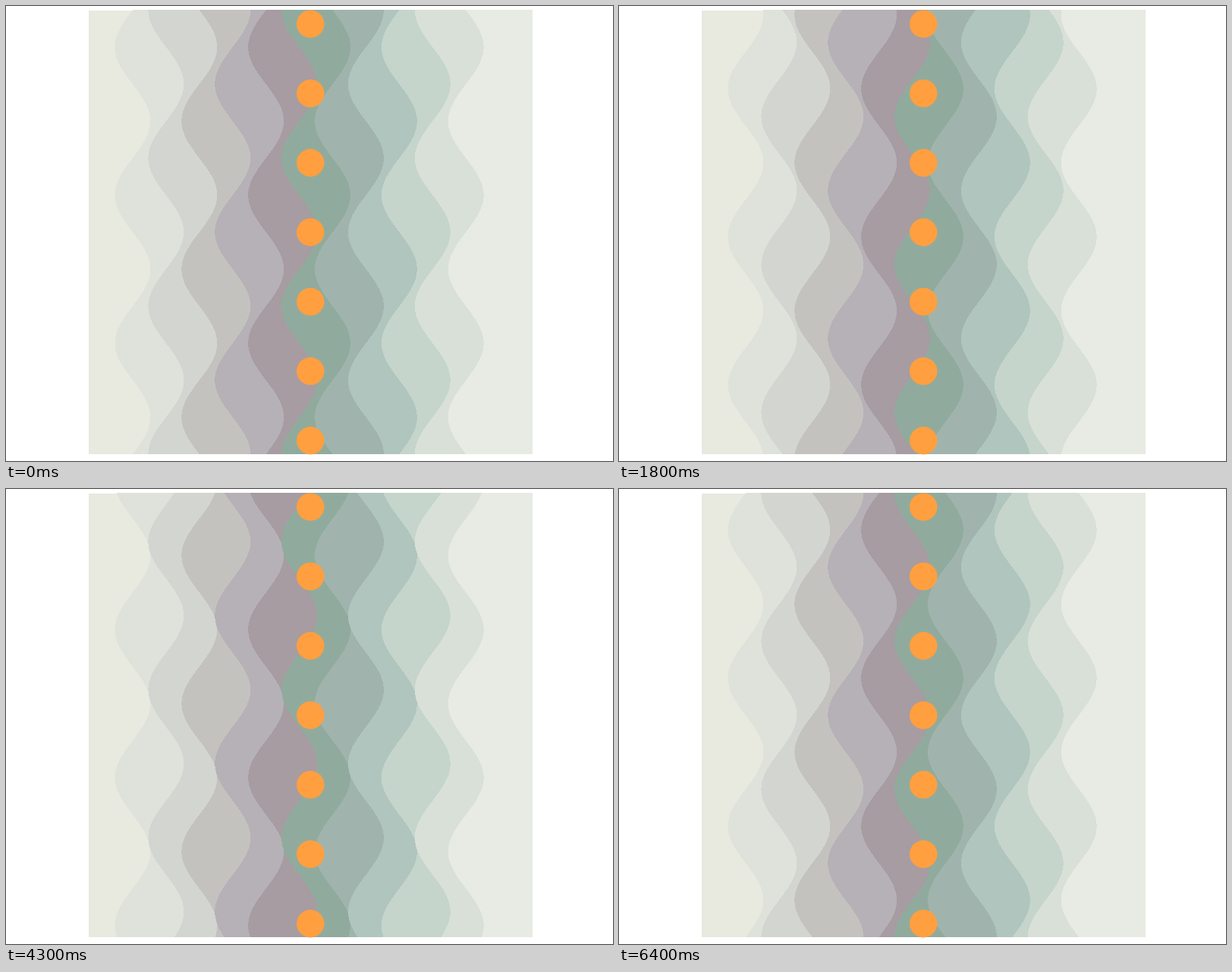
Animation, 800 px wide and 600 px high, one loop 6.5 s. Source, as an HTML page with a canvas:

```html
<!DOCTYPE html>
<html lang="en">
<head>
<meta charset="utf-8">
<title>Waves</title>
<style>
  html, body { margin: 0; width: 100%; height: 100%; overflow: hidden; background: #fff; }
  canvas { display: block; }
</style>
</head>
<body>
<canvas id="stage" width="800" height="600"></canvas>
<script>
const ctx = document.getElementById('stage').getContext('2d');
const LEFT = 109, RIGHT = 694, TOP = 5, BOTTOM = 591;
const UNIT = 14.64;
const AMPLITUDE = 1.6 * UNIT, SPACING = 3 * UNIT, FIRST_X = 166.95;
const WAVELENGTH = 195.2, WAVE_TOP = 5.4;
const STEP_MS = 100, STEPS = 65, STEPS_PER_TURN = 64;
const BACKGROUND = '#e8e9df', BALL = '#ff9f40';
const LAYERS = ['#dfe2da', '#d3d5d1', '#c4c2bf', '#b6b1b6', '#a69ca2', '#90ab9d',
                '#a0b4ad', '#b0c5be', '#c5d5cb', '#d9e0d8', '#e7ebe3'];

// Alternate edges travel down and up; the sign flips every two edges.
function edgeX(index, y, turn) {
  const angle = (y - WAVE_TOP) / WAVELENGTH * 2 * Math.PI;
  const sign = index % 4 < 2 ? -1 : 1;
  const wave = index % 2 ? Math.cos(angle + turn) : Math.sin(angle - turn);
  return FIRST_X + index * SPACING + sign * AMPLITUDE * wave;
}

function draw(step) {
  const turn = step / STEPS_PER_TURN * 2 * Math.PI;
  ctx.fillStyle = '#fff';
  ctx.fillRect(0, 0, 800, 600);
  ctx.fillStyle = BACKGROUND;
  ctx.fillRect(LEFT, TOP + 1, RIGHT - LEFT, BOTTOM - TOP - 1);

  // Whole-pixel rows keep the edges crisp.
  LAYERS.forEach((color, index) => {
    ctx.fillStyle = color;
    for (let y = TOP; y < BOTTOM; y++) {
      const x = Math.round(edgeX(index, y + 0.5, turn));
      ctx.fillRect(x, y, RIGHT - x, 1);
    }
  });

  ctx.fillStyle = BALL;
  for (let i = 0; i < 7; i++) {
    ctx.beginPath();
    ctx.arc(401.2, 23.7 + i * 91.57, 1.25 * UNIT, 0, 2 * Math.PI);
    ctx.fill();
  }
}

let shown = -1;
function tick() {
  const step = Math.floor(performance.now() / STEP_MS) % STEPS;
  if (step !== shown) draw(shown = step);
  requestAnimationFrame(tick);
}
tick();
</script>
</body>
</html>
```
